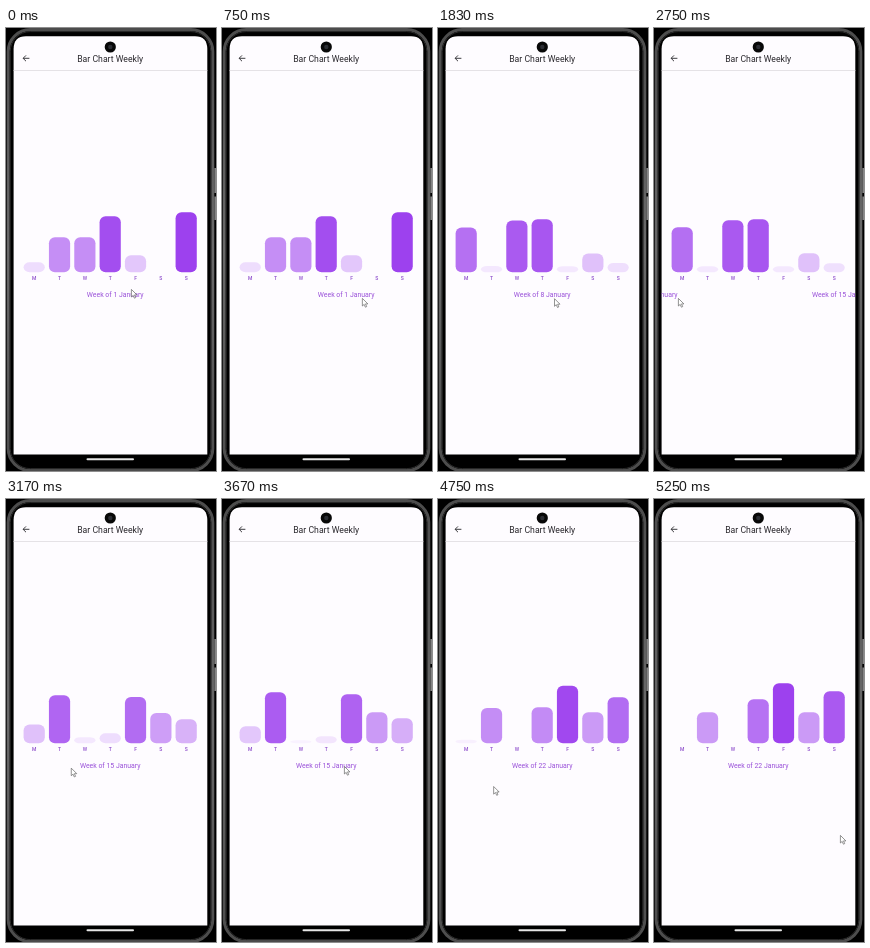
An HTML page that plays this animation: 210 by 443 pixels, repeating every 5330 ms.

```html
<!DOCTYPE html>
<html lang="en">
<head>
<meta charset="utf-8">
<title>Bar Chart Weekly</title>
<style>
  html, body { margin: 0; width: 100%; height: 100%; overflow: hidden; background: #000; }
  svg { display: block; width: 210px; height: 443px; }
  text { font-family: Roboto, sans-serif; text-anchor: middle; }
  .title { font-size: 8.7px; fill: #29272c; }
  .day { font-size: 5px; font-weight: 500; fill: #8f50cc; }
  .week { font-size: 6.9px; fill: #9950d9; }
</style>
</head>
<body>
<svg viewBox="0 0 210 443">
  <defs>
    <clipPath id="screen"><path d="M7.6 426.4V21Q7.6 8.2 20 8.2H189Q201.3 8.2 201.3 21V426.4Z"/></clipPath>
    <linearGradient id="metal" x2="0" y2="1">
      <stop stop-color="#4c4c4c"/><stop offset=".5" stop-color="#6a6a6a"/><stop offset="1" stop-color="#4c4c4c"/>
    </linearGradient>
  </defs>
  <rect width="210" height="443"/>
  <rect x="2.2" y="1.6" width="204.6" height="441" rx="22" fill="none" stroke="url(#metal)" stroke-width="3"/>
  <rect x="4.2" y="3.6" width="200.6" height="437" rx="20" fill="none" stroke="#2a2a2a"/>
  <path d="M209.2 140V165M209.2 168.5V192" stroke="#858585" stroke-width="1.6"/>
  <g clip-path="url(#screen)">
    <rect x="7" y="8" width="195" height="419" fill="#fefcff"/>
    <path d="M7 42.5H202" stroke="#e2dfe4" stroke-width=".9"/>
    <path d="M23.4 30.3H17.2M20 27.4L17.1 30.3L20 33.2" fill="none" stroke="#29272c" stroke-width=".9"/>
    <text class="title" x="104.2" y="33.6">Bar Chart Weekly</text>
    <g id="bars" fill="#9a3bee"></g>
    <g id="days"></g>
    <g id="weeks"></g>
  </g>
  <circle cx="104.3" cy="19" r="5.6" fill="#080808"/>
  <circle cx="104.3" cy="19" r="2.2" fill="#2b2d33"/>
  <rect x="80.5" y="430.2" width="47.5" height="2" rx="1" fill="#e6e6e6"/>
  <path id="cursor" d="M.4 .4V8L2.2 6.4L3.4 9.2L4.7 8.6L3.5 5.9H5.9Z" fill="#fff" stroke="#666" stroke-width=".7" stroke-linejoin="round"/>
</svg>
<script>
const LOOP = 5330, FPS = 12, PAGE = 193, MID = 104.2, BASE = 244.3, FULL = 62;
const DAYS = 'MTWTFSS';
const WEEKS = [
  [10, 35, 35, 56, 17, 0, 60],
  [45, 6, 52, 53, 6, 19, 9],
  [17, 51, 3, 7, 49, 31, 25],
  [0, 31, 0, 44, 60, 31, 52]
];

// Times are in ticks of 1/12 s: drag from grab to hold, let go, rest until the next grab.
const swipes = [
  { grab: 8, hold: 16, power: 4, drag: 95.5, at: [30, 274], back: 23, rest: [123, 270] },
  { grab: 27, hold: 33, power: 1, drag: 109, at: [24, 270], back: 43, rest: [122, 267] },
  { grab: 44, hold: 53, power: 1, drag: 104.5, at: [9.5, 270], back: 63, rest: [186, 336] }
];

const lerp = (a, b, k) => a + (b - a) * k;
const mix = (p, q, k) => p.map((v, i) => lerp(v, q[i], k));
const span = (t, from, to) => Math.min(1, Math.max(0, (t - from) / (to - from)));
const easeOut = k => 1 - (1 - k) ** 3;
const smooth = k => k * k * (3 - 2 * k);

const dragged = (s, t) => span(t, s.grab, s.hold) ** s.power;
const scrolled = (s, t) =>
  lerp(s.drag * dragged(s, t), PAGE, easeOut(span(t, s.hold, s.hold + 3)));
const charted = (s, t) => easeOut(span(t, s.hold + 2, s.hold + 7));
const sum = (fn, t) => swipes.reduce((total, s) => total + fn(s, t), 0);

// The first page is pulled right a little before the first swipe.
const nudge = t => 5 + 14 * span(t, 0, 1) + 18 * span(t, 3, 6) - 17 * span(t, 6, 7);

function pointer(t) {
  let pos = [120 + nudge(t), 261 + 9 * span(t, 0, 7)];
  for (const s of swipes) {
    pos = mix(pos, s.at, dragged(s, t));
    pos = mix(pos, s.rest, smooth(span(t, s.hold + 1, s.back)));
  }
  return pos;
}

const $ = id => document.getElementById(id);

function add(parent, tag, attrs, label = '') {
  const el = document.createElementNS('http://www.w3.org/2000/svg', tag);
  for (const name in attrs) el.setAttribute(name, attrs[name]);
  el.textContent = label;
  return $(parent).appendChild(el);
}

const bars = [...DAYS].map((day, i) => {
  const x = 28.2 + i * 25.33;
  add('days', 'text', { class: 'day', x, y: 252.1 }, day);
  return add('bars', 'rect', { x: x - 10.6, width: 21.2, rx: 6 });
});
WEEKS.forEach((_, i) =>
  add('weeks', 'text', { class: 'week', x: MID + i * PAGE, y: 269.3 }, `Week of ${1 + 7 * i} January`));

function draw(now) {
  const t = Math.floor((now % LOOP + 4) * FPS / 1000);
  const shift = nudge(t) * (1 - dragged(swipes[0], t)) - sum(scrolled, t);
  const page = sum(charted, t);
  const from = Math.floor(page), to = Math.min(from + 1, WEEKS.length - 1);
  const heights = mix(WEEKS[from], WEEKS[to], page - from);

  $('cursor').setAttribute('transform', `translate(${pointer(t)})`);
  $('weeks').setAttribute('transform', `translate(${shift} 0)`);
  bars.forEach((bar, i) => {
    bar.setAttribute('y', BASE - heights[i]);
    bar.setAttribute('height', heights[i]);
    bar.setAttribute('opacity', heights[i] / FULL);
  });
  requestAnimationFrame(draw);
}
draw(performance.now());
</script>
</body>
</html>
```
